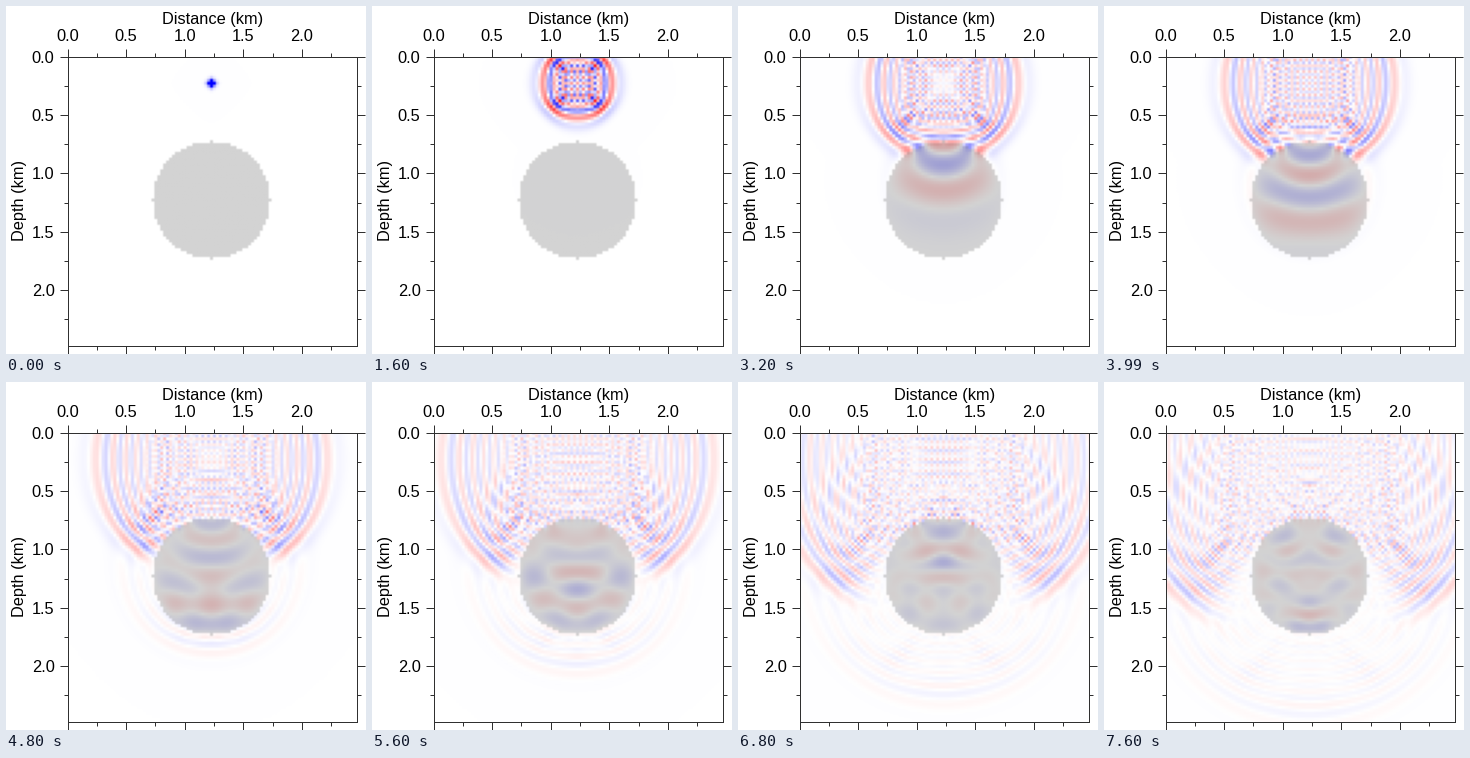
These frames come from a looping animation (360 px wide and 348 px high, 8 s). A matplotlib script:

```python
import numpy as np
import matplotlib.pyplot as plt
from matplotlib.animation import FuncAnimation
from matplotlib.ticker import MultipleLocator

plt.rcParams["font.family"] = "Liberation Sans"

WIDTH, HEIGHT, DPI = 360, 348, 100
FRAMES, INTERVAL = 20, 400
CELLS, PAD, SPACING = 100, 40, 0.025      # grid spacing in km
CENTRE, RADIUS, SOURCE_ROW = 49, 20, 9
STEPS = 30                                # time steps per frame
SPEED, CONTRAST = 3.6, 3.0                # cells per frame, inside / outside
FREQUENCY, PEAK_TIME = 0.9, 0.22          # cycles per frame, frames
GAIN = 220
LINE = "#303030"

row, col = np.indices((CELLS + 2 * PAD,) * 2) - PAD
disc = (row - CENTRE) ** 2 + (col - CENTRE) ** 2 <= RADIUS ** 2
courant2 = (SPEED / STEPS * np.where(disc, CONTRAST, 1.0)) ** 2
window = slice(PAD, PAD + CELLS)
shade = np.where(disc, 211 / 255, 1.0)[window, window, None]


def laplacian(u):
    """Second-order five-point stencil; its coarse dispersion is part of the look."""
    return (np.roll(u, 1, 0) + np.roll(u, -1, 0)
            + np.roll(u, 1, 1) + np.roll(u, -1, 1) - 4 * u)


def ricker(t):
    a = (np.pi * FREQUENCY * (t - PEAK_TIME)) ** 2
    return (1 - 2 * a) * np.exp(-a)


def simulate():
    old = np.zeros(disc.shape)
    now = old.copy()
    fields = []
    for step in range(-2 * STEPS, (FRAMES - 1) * STEPS + 1):
        new = 2 * now - old + courant2 * laplacian(now)
        new[PAD + SOURCE_ROW, PAD + CENTRE] += GAIN * ricker(step / STEPS) / STEPS ** 2
        old, now = now, new
        if step >= 0 and step % STEPS == 0:
            fields.append(now[window, window].copy())
    return fields


def colour(field):
    """Blue - white - red, darkened where the disc lies."""
    v = np.clip(field, -1, 1)
    rgb = np.stack([1 + np.minimum(v, 0), 1 - np.abs(v), 1 - np.maximum(v, 0)], axis=-1)
    return rgb * shade


fields = simulate()

fig = plt.figure(figsize=(WIDTH / DPI, HEIGHT / DPI), dpi=DPI, facecolor="white")
left, right, top, bottom = 61.6, 351.4, 50.6, 339.6
ax = fig.add_axes([left / WIDTH, 1 - bottom / HEIGHT,
                   (right - left) / WIDTH, (bottom - top) / HEIGHT])
size = (CELLS - 1) * SPACING
half = SPACING / 2
image = ax.imshow(colour(fields[0]), interpolation="hanning", aspect="auto",
                  extent=(-half, size + half, size + half, -half))
ax.set(xlim=(0, size), ylim=(size, 0))

for axis in (ax.xaxis, ax.yaxis):
    axis.set_major_locator(MultipleLocator(0.5))
    axis.set_minor_locator(MultipleLocator(0.25))
    axis.set_major_formatter("{x:.1f}")
px = 72 / DPI
ax.tick_params(which="both", top=True, right=True, bottom=True, left=True,
               width=px, color=LINE)
ax.tick_params(which="major", length=8 * px, labelsize=16.4 * px, pad=5 * px,
               labeltop=True, labelbottom=False)
ax.tick_params(which="minor", length=4 * px)
for spine in ax.spines.values():
    spine.set(linewidth=px, color=LINE)


def title(x, y, text, **kwargs):
    fig.text(x / WIDTH, 1 - y / HEIGHT, text, fontsize=16.4 * px,
             ha="center", va="center", **kwargs)


title(206.5, 13.5, "Distance (km)")
title(13.5, 195, "Depth (km)", rotation=90)


def update(i):
    image.set_data(colour(fields[i]))
    return [image]


anim = FuncAnimation(fig, update, frames=FRAMES, interval=INTERVAL,
                     repeat=True, repeat_delay=0)
plt.show()
```
